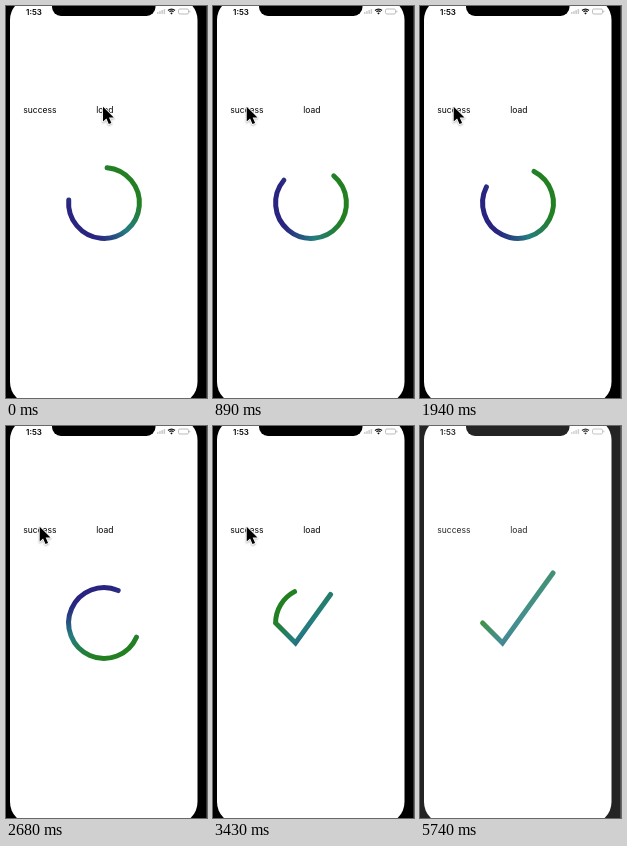
An HTML page with a canvas that plays this animation: 201 px wide and 392 px high, repeating every 5760 ms.

```html
<!DOCTYPE html>
<html lang="en">
<head>
<meta charset="utf-8">
<title>Loading ring to check mark</title>
<style>
  html, body { margin: 0; width: 100%; height: 100%; overflow: hidden; background: #fff; }
  canvas { display: block; width: 201px; height: 392px; }
</style>
</head>
<body>
<canvas id="stage"></canvas>
<script>
const W = 201, H = 392, LOOP = 5760;
const canvas = document.getElementById('stage');
const dpr = window.devicePixelRatio || 1;
canvas.width = Math.round(W * dpr);
canvas.height = Math.round(H * dpr);
const ctx = canvas.getContext('2d');

const RAD = Math.PI / 180;
const RING = { x: 98, y: 197, r: 35.4, width: 5 };
const CHECK = [[-35.4, 0], [-15.5, 20], [35, -50]];
const SPIN = [[0, -85], [6, -410], [13, -783], [18, -1056.4]];
const MORPH_START = 18.9, MORPH_STEPS = 5.33;

const clamp = v => Math.max(0, Math.min(1, v));
const mix = (a, b, k) => a + (b - a) * k;
const smooth = k => k * k * (3 - 2 * k);

function stepTime(n) {
  return 150 * n - 10 * ((n > 0) + (n > 16) + (n > 24) + (n > 25));
}

function stepAt(t) {
  let n = 0;
  while (n < 30 && stepTime(n + 1) <= t + 0.5) n++;
  return n;
}

function headAngle(n) {
  let i = 0;
  while (i < SPIN.length - 2 && n > SPIN[i + 1][0]) i++;
  const [n0, a0] = SPIN[i], [n1, a1] = SPIN[i + 1];
  return mix(a0, a1, (n - n0) / (n1 - n0));
}

function box(x, y, w, h, r, fill) {
  ctx.beginPath();
  ctx.roundRect(x, y, w, h, r);
  ctx.fillStyle = fill;
  ctx.fill();
}

function label(text, x, y, font) {
  ctx.font = font + ' Inter, Roboto, sans-serif';
  ctx.fillStyle = '#000';
  ctx.fillText(text, x, y);
}

function drawStatus() {
  label('1:53', 20, 8.5, '600 8px');
  for (let i = 0; i < 4; i++) {
    const h = 2 + i;
    box(151 + i * 2.2, 8 - h, 1.5, h, 0.4, '#c8c8c8');
  }
  ctx.strokeStyle = '#111';
  ctx.lineWidth = 1.2;
  ctx.lineCap = 'butt';
  for (const r of [2.9, 4.9]) {
    ctx.beginPath();
    ctx.arc(165.5, 8, r, -135 * RAD, -45 * RAD);
    ctx.stroke();
  }
  ctx.beginPath();
  ctx.moveTo(165.5, 8.4);
  ctx.arc(165.5, 8.4, 1.7, -135 * RAD, -45 * RAD);
  ctx.fillStyle = '#111';
  ctx.fill();
  ctx.beginPath();
  ctx.roundRect(172.5, 3, 10, 5, 1.4);
  ctx.strokeStyle = '#aaa';
  ctx.lineWidth = 0.8;
  ctx.stroke();
  box(183.4, 4.6, 0.9, 1.9, 0.4, '#aaa');
}

function drawPhone() {
  ctx.fillStyle = '#000';
  ctx.fillRect(0, 0, W, H);
  ctx.fillStyle = '#333';
  ctx.fillRect(200, 0, 1, H);
  box(4, -8, 187.5, 406, 22, '#fff');
  box(46, -12, 103.5, 22, 9, '#000');
  drawStatus();
  label('success', 17.3, 107, '8.5px');
  label('load', 90.3, 107, '8.5px');
}

function drawRing(n) {
  const p = clamp((n - MORPH_START) / MORPH_STEPS);
  ctx.save();
  ctx.translate(RING.x, RING.y);
  if (n < MORPH_START) ctx.rotate((headAngle(n) - 180) * RAD);

  const g = ctx.createLinearGradient(-20, -20, 20, 20);
  g.addColorStop(0, '#228022');
  g.addColorStop(0.5, '#247d80');
  g.addColorStop(1, '#292480');
  ctx.strokeStyle = g;
  ctx.lineWidth = RING.width;
  ctx.lineCap = 'round';
  ctx.lineJoin = 'miter';

  ctx.beginPath();
  if (p < 1) ctx.arc(0, 0, RING.r, (180 + 270 * (1 - p)) * RAD, Math.PI, true);
  else ctx.moveTo(...CHECK[0]);

  // The head leaves the ring and runs along the check mark.
  const legs = [0, 1].map(i =>
    Math.hypot(CHECK[i + 1][0] - CHECK[i][0], CHECK[i + 1][1] - CHECK[i][1]));
  let left = p * (legs[0] + legs[1]);
  for (let i = 0; i < 2 && left > 0; i++) {
    const k = Math.min(1, left / legs[i]);
    ctx.lineTo(mix(CHECK[i][0], CHECK[i + 1][0], k), mix(CHECK[i][1], CHECK[i + 1][1], k));
    left -= legs[i];
  }
  ctx.stroke();
  ctx.restore();
}

function drawCursor(n) {
  if (n >= 30) return;
  const slide = smooth(clamp((n - 1) / 4));
  const leave = clamp((n - 27) / 2);
  const x = mix(mix(97, 33.7, slide), 118, leave);
  const y = mix(100.8, 290, leave);
  ctx.save();
  ctx.translate(x, y);
  ctx.beginPath();
  ctx.moveTo(0, 0);
  for (const [px, py] of [[0, 14.8], [3.4, 11.7], [5.8, 17.3], [8.4, 16.2], [6, 10.8], [10.8, 10.8]])
    ctx.lineTo(px, py);
  ctx.closePath();
  ctx.lineJoin = 'round';
  ctx.lineWidth = 1.6;
  ctx.strokeStyle = '#fff';
  ctx.shadowColor = 'rgba(0,0,0,.3)';
  ctx.shadowBlur = 2 * dpr;
  ctx.shadowOffsetY = dpr;
  ctx.stroke();
  ctx.shadowColor = 'transparent';
  ctx.fillStyle = '#000';
  ctx.fill();
  ctx.restore();
}

function draw(t) {
  const n = stepAt(t);
  ctx.setTransform(dpr, 0, 0, dpr, 0, 0);
  drawPhone();
  drawRing(n);
  drawCursor(n);
  if (t >= 5739.5) {
    ctx.fillStyle = 'rgba(255,255,255,.14)';
    ctx.fillRect(0, 0, W, H);
  }
}

function tick() {
  draw(performance.now() % LOOP);
  requestAnimationFrame(tick);
}
tick();
</script>
</body>
</html>
```
